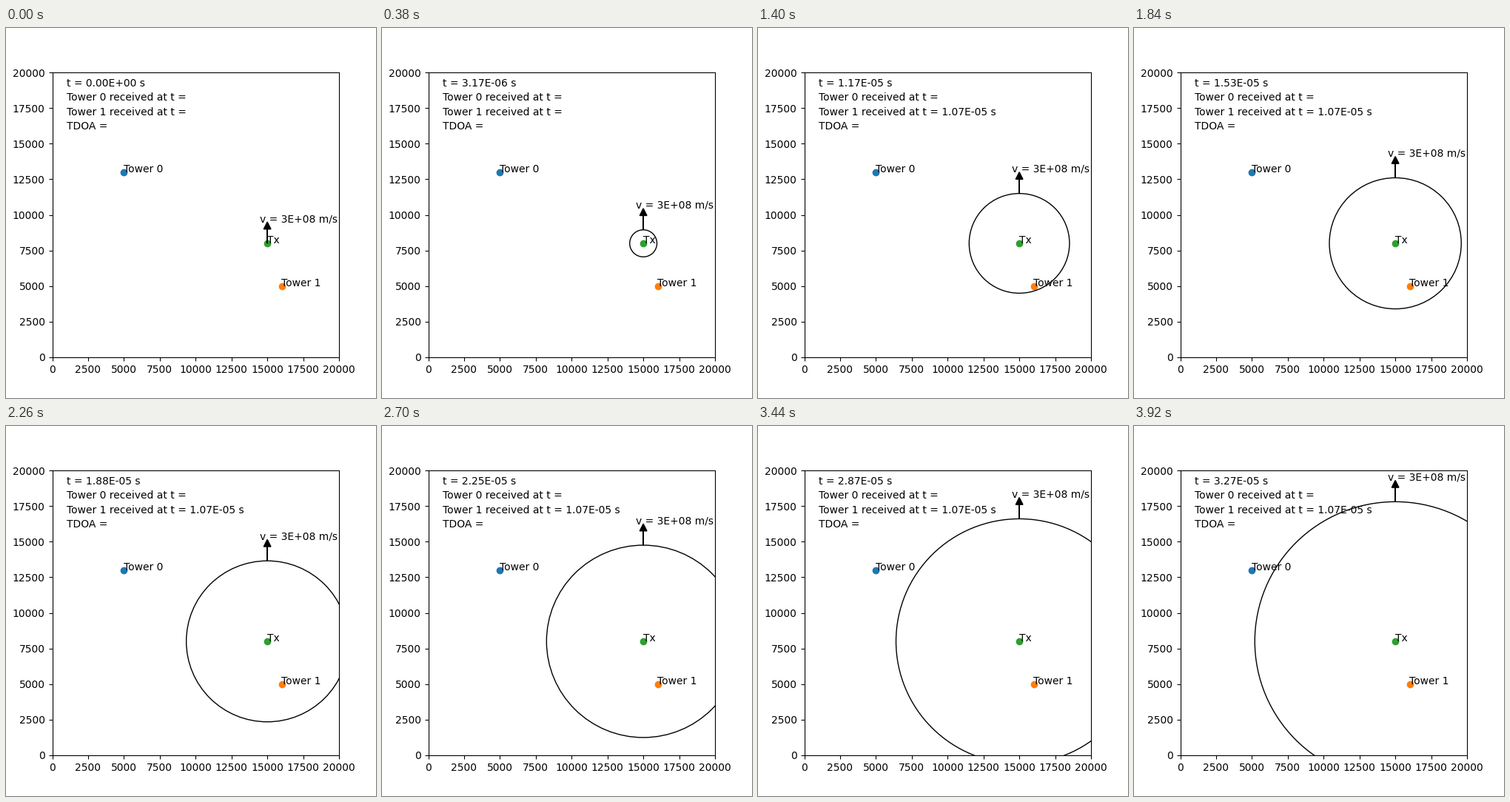
Write a matplotlib script that moves like this. It is 500x500 px and loops after 3940 ms.

```python
import math

import matplotlib.pyplot as plt
from matplotlib.animation import FuncAnimation
from matplotlib.patches import Circle

SIZE = 20000
SPEED = 3e8      # m/s
STEP = 50        # metres travelled per frame
FRAMES = 197
TX = (15000, 8000)
TOWERS = [(5000, 13000), (16000, 5000)]

fig = plt.figure(figsize=(5, 5), dpi=100)
ax = fig.add_subplot()

for name, pos in [("Tower 0", TOWERS[0]), ("Tower 1", TOWERS[1]), ("Tx", TX)]:
    ax.scatter(*pos)
    ax.text(*pos, name)

wave = ax.add_patch(Circle(TX, 0, fill=False))
arrow = ax.arrow(*TX, 0, 1000, head_width=500, head_length=500, fc="k", ec="k")
speed_text = ax.text(TX[0] - 500, TX[1] + 1500, f"v = {SPEED:.0E} m/s")
clock = ax.text(1000, 19000, "")
received = [ax.text(1000, 18000 - 1000 * k, "") for k in range(len(TOWERS))]
tdoa = ax.text(1000, 16000, "")

ax.set_xlim(0, SIZE)
ax.set_ylim(0, SIZE)


def arrival(tower):
    """Time of the first step at which the wave has reached the tower."""
    steps = math.ceil(math.dist(TX, tower) / STEP)
    return steps * STEP / SPEED


ARRIVALS = [arrival(tower) for tower in TOWERS]


def update(i):
    radius = i * STEP
    t = radius / SPEED
    wave.set_radius(radius)
    arrow.set_data(y=TX[1] + radius)
    speed_text.set_y(TX[1] + radius + 1500)
    clock.set_text(f"t = {t:.2E} s")

    for k, (label, hit) in enumerate(zip(received, ARRIVALS)):
        value = f"{hit:.2E} s" if t >= hit else ""
        label.set_text(f"Tower {k} received at t = {value}")
    done = t >= max(ARRIVALS)
    value = f"{abs(ARRIVALS[0] - ARRIVALS[1]):.2E} s" if done else ""
    tdoa.set_text(f"TDOA = {value}")
    return wave, arrow, speed_text, clock, *received, tdoa


anim = FuncAnimation(fig, update, frames=FRAMES, interval=20,
                     repeat=True, repeat_delay=0, blit=False)
plt.show()
```
